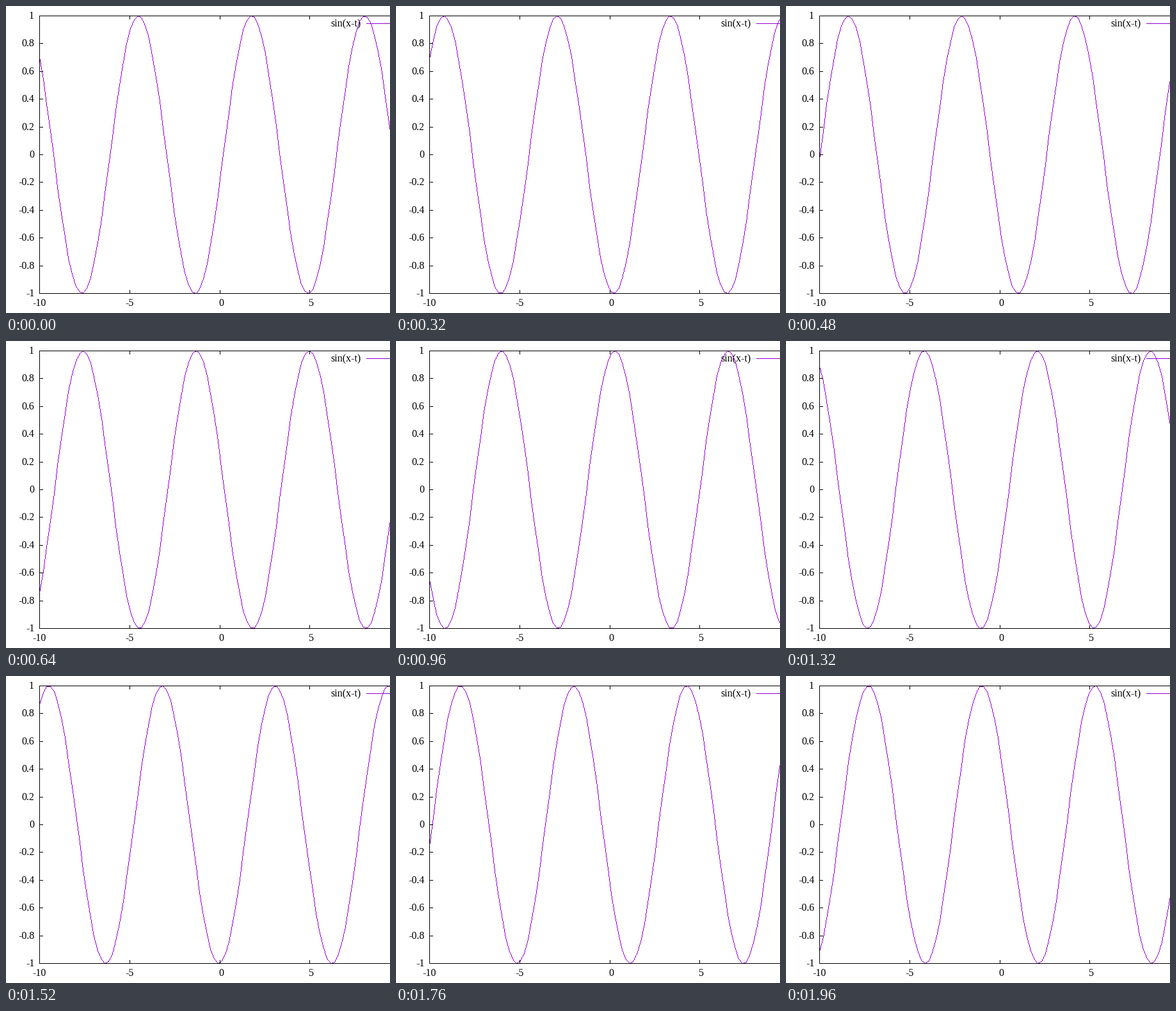
A matplotlib script that plays this animation: 600x480 px, repeating every 2 s.

```python
import numpy as np
import matplotlib.pyplot as plt
from matplotlib.animation import FuncAnimation

W, H, DPI = 600, 480, 100
FRAMES, INTERVAL = 50, 40
LEFT, TOP, BOTTOM = 52, 15, 449
X_UNIT, Y_UNIT = 28.15, 217
TICK = 6
BLACK = (0, 0, 0, 255)
PURPLE = (148, 0, 211, 255)

plt.rcParams["font.family"] = "Liberation Serif"
plt.rcParams["font.size"] = 16 * 72 / DPI


def to_col(x):
    return np.floor(LEFT + (x + 10) * X_UNIT + 0.5).astype(int)


def to_row(y):
    return np.floor(TOP + (1 - y) * Y_UNIT + 0.5).astype(int)


def text_width(s):
    return sum({"-": 5.33, ".": 4}.get(c, 8) for c in s)


x_ticks = np.arange(-10, 10, 5)
y_ticks = np.arange(-5, 6) / 5
samples = np.linspace(-10, 10, 100)
cols = to_col(samples)

fig = plt.figure(figsize=(W / DPI, H / DPI), dpi=DPI, facecolor="white")
ax = fig.add_axes([0, 0, 1, 1])
canvas = np.zeros((H, W, 4), np.uint8)
image = ax.imshow(canvas, extent=(0, W, H, 0), aspect="auto",
                  interpolation="nearest", zorder=3)
ax.set(xlim=(0, W), ylim=(H, 0))
ax.axis("off")


def label(x, y, s):
    ax.text(x, y, s, ha="left", va="baseline", color="black", zorder=2)


for v in y_ticks:
    s = f"{v:g}"
    label(round(44 - text_width(s)), to_row(v) + 5, s)
for v in x_ticks:
    s = str(v)
    shift = 0 if v < 0 else 2
    label(round(to_col(v) - text_width(s) / 2 + shift), 469, s)
label(507, 32, "sin(x-t)")


def draw_curve(rows):
    """Plot a one-pixel polyline without smoothing."""
    for x0, x1, y0, y1 in zip(cols, cols[1:], rows, rows[1:]):
        n = max(abs(x1 - x0), abs(y1 - y0)) + 1
        px = np.rint(np.linspace(x0, x1, n)).astype(int)
        py = np.rint(np.linspace(y0, y1, n)).astype(int)
        seen = px < W
        canvas[py[seen], px[seen]] = PURPLE


def draw_border():
    canvas[[TOP, BOTTOM], LEFT:] = BLACK
    canvas[TOP:BOTTOM + 1, LEFT] = BLACK
    for row in to_row(y_ticks):
        canvas[row, LEFT:LEFT + TICK] = BLACK
    for col in to_col(x_ticks):
        canvas[TOP:TOP + TICK, col] = BLACK
        canvas[BOTTOM - TICK + 1:BOTTOM + 1, col] = BLACK


def update(i):
    t = 0.2 * (i + 1)
    canvas[:] = 0
    canvas[27, 563:] = PURPLE
    draw_curve(to_row(np.sin(samples - t)))
    draw_border()
    image.set_data(canvas)
    return [image]


anim = FuncAnimation(fig, update, frames=FRAMES, interval=INTERVAL,
                     init_func=lambda: update(0), repeat=True, repeat_delay=0)
plt.show()
```
